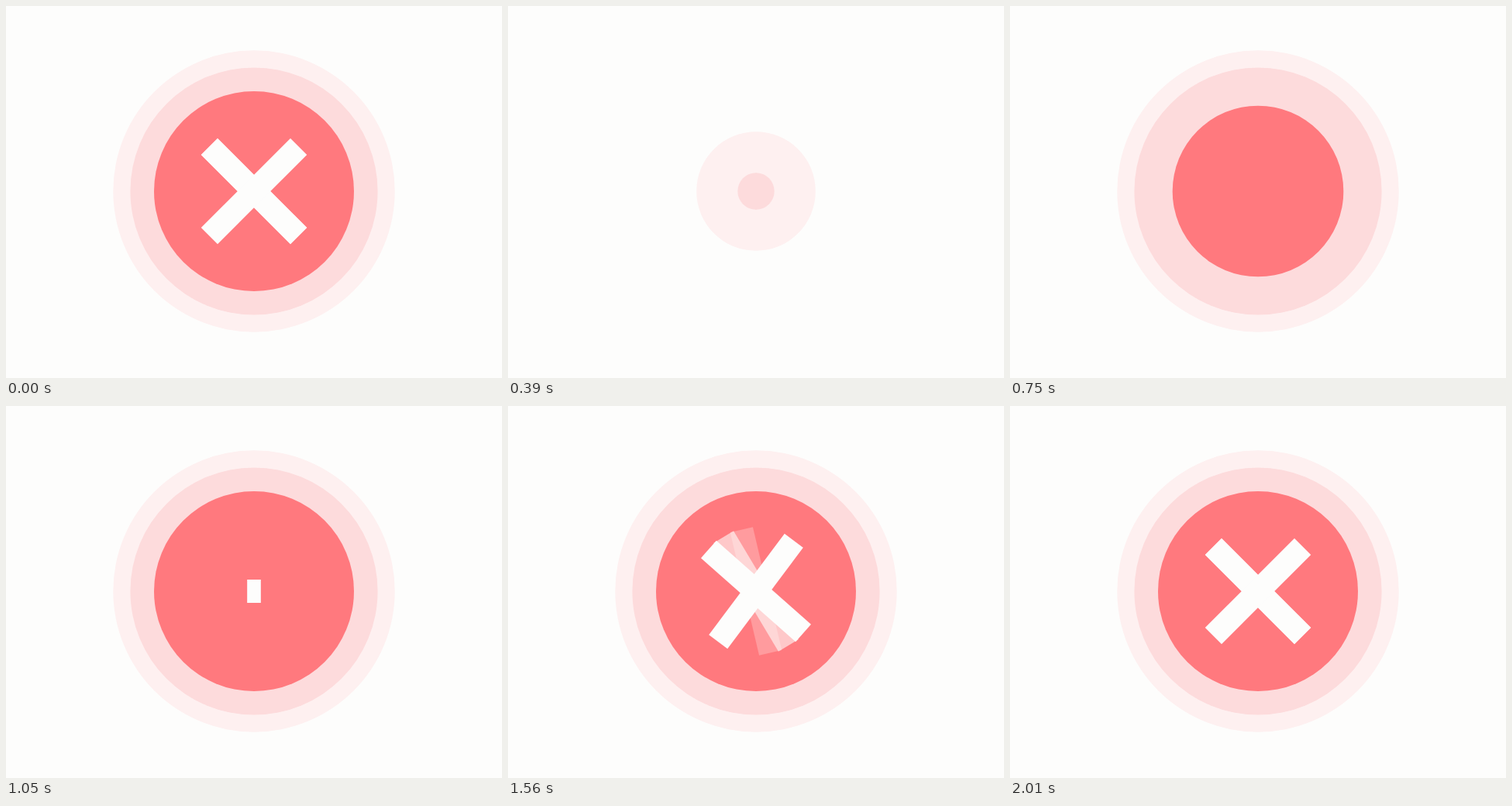
Write an HTML page that moves like this. It is 640 px wide and 480 px high and loops after 2.25 s.

```html
<!DOCTYPE html>
<html lang="en">
<head>
<meta charset="utf-8">
<title>Error badge</title>
<style>
  html, body { margin: 0; width: 100%; height: 100%; overflow: hidden; background: #fdfdfc; }
  svg { display: block; width: 100vw; height: 100vh; }
</style>
</head>
<body>
<svg viewBox="0 0 640 480">
  <g transform="translate(320 239)">
    <circle id="halo" fill="#fef0f0"/>
    <circle id="ring" fill="#fddbdc"/>
    <circle id="disc" fill="#ff797e"/>
    <g id="cross" fill="#fdfdfc">
      <rect class="bar" opacity=".25"/>
      <rect class="bar" opacity=".6"/>
      <rect class="bar"/>
      <rect class="bar"/>
    </g>
  </g>
</svg>
<script>
const LOOP = 2250, STEP = 30;
const BAR_LENGTH = 163, BAR_WIDTH = 30;
const circles = [
  { id: 'halo', radius: 181.7, start: 173, duration: 484 },
  { id: 'ring', radius: 159.6, start: 284, duration: 436 },
  { id: 'disc', radius: 129, start: 382, duration: 484 }
].map(c => ({ ...c, node: document.getElementById(c.id) }));
const bars = [...document.querySelectorAll('.bar')];

const progress = (t, start, duration) =>
  Math.min(1, Math.max(0, (t - start) / duration));

function ease(t, start, duration) {
  const s = progress(t, start, duration);
  return s * s * (3 - 2 * s);
}

// Each arm swings past its resting angle, then settles back.
const wideSwing = t => 150 * progress(t, 1324.5, 255) - 15 * ease(t, 1579.5, 240);
const shortSwing = t => 53.3 * ease(t, 1302, 243) - 8.3 * ease(t, 1545, 260);

function render(time) {
  const now = time % LOOP;
  // The finished badge is held for one step before the stage clears.
  const t = now < STEP ? LOOP : Math.floor(now / STEP + 1e-4) * STEP;

  for (const c of circles) {
    c.node.setAttribute('r', c.radius * ease(t, c.start, c.duration));
  }

  const length = BAR_LENGTH * ease(t, 990, 300);
  const angles = [
    wideSwing(t - 2 * STEP), wideSwing(t - STEP), wideSwing(t), shortSwing(t)
  ];
  bars.forEach((bar, i) => {
    bar.setAttribute('x', -length / 2);
    bar.setAttribute('y', -BAR_WIDTH / 2);
    bar.setAttribute('width', length);
    bar.setAttribute('height', BAR_WIDTH);
    bar.setAttribute('transform', `rotate(${-angles[i]})`);
  });
}

const origin = performance.now();
function tick() {
  render(performance.now() - origin);
  requestAnimationFrame(tick);
}
tick();
</script>
</body>
</html>
```
